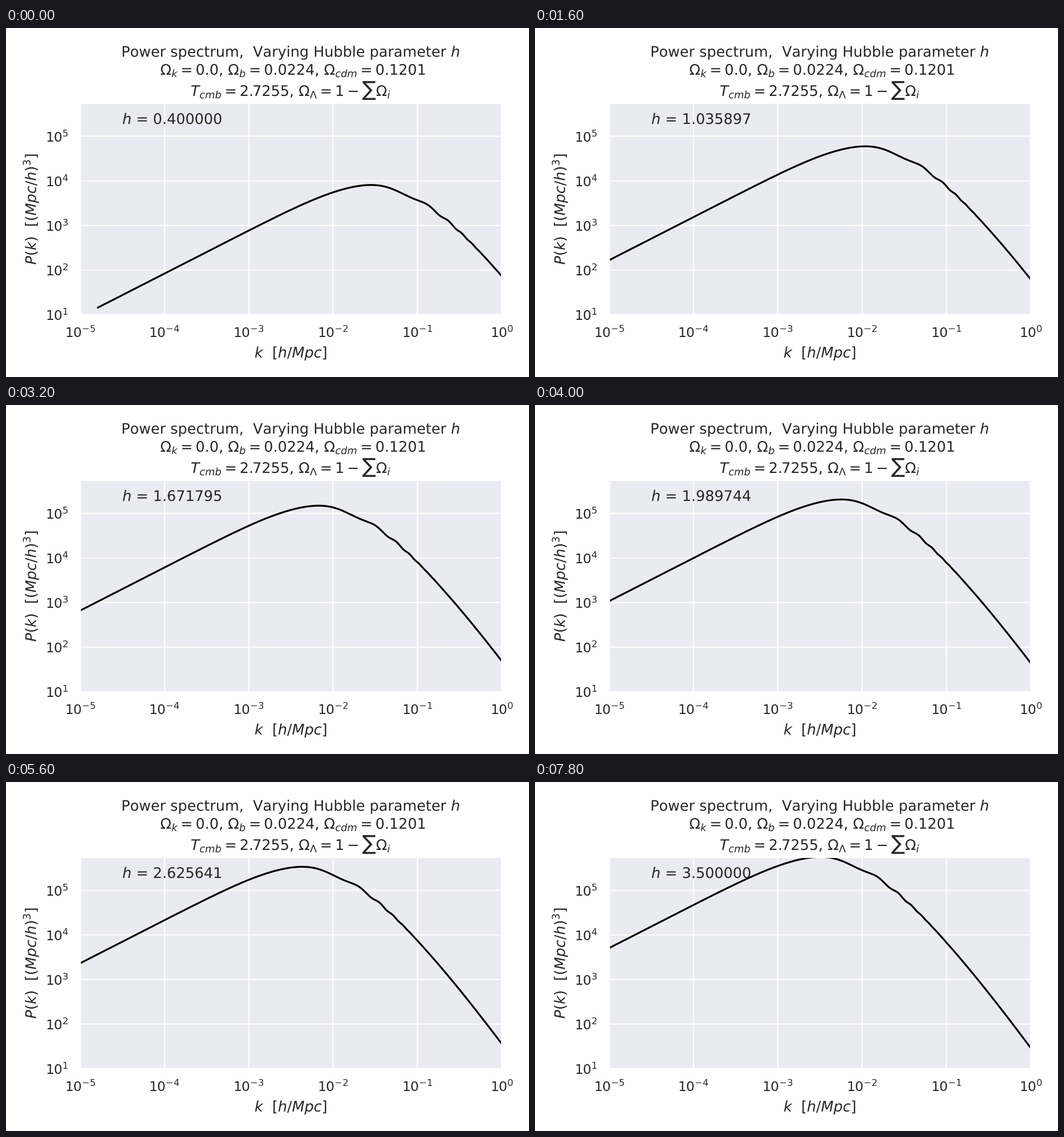
Animation of 917 by 611 pixels, one loop 8000 ms. Source, as a matplotlib script:

```python
import numpy as np
import matplotlib.pyplot as plt
from matplotlib.animation import FuncAnimation
from matplotlib.patheffects import Normal

W, H, DPI = 917, 611, 128
S = W / 6 / DPI                      # type and line scale of a 6 inch wide figure
FRAMES, INTERVAL = 40, 200
HUBBLE = np.linspace(0.4, 3.5, FRAMES)

# Physical densities and primordial spectrum
WB, WC, WR = 0.0224, 0.1201, 4.18e-5
WM = WB + WC
T_CMB = 2.7255
A_S, N_S, K_PIVOT = 2.135e-9, 0.966, 0.05
HUBBLE_DIST = 2997.92                # c / (100 km/s/Mpc)
MID = (np.arange(4000) + 0.5) / 4000


def transfer(k):
    """Eisenstein & Hu (1998) matter transfer function, k in 1/Mpc."""
    fb, fc = WB / WM, WC / WM
    th2 = (T_CMB / 2.7) ** 2
    z_eq = 2.5e4 * WM / th2 ** 2
    k_eq = 0.0746 * WM / th2
    b1 = 0.313 * WM ** -0.419 * (1 + 0.607 * WM ** 0.674)
    b2 = 0.238 * WM ** 0.223
    z_d = 1291 * WM ** 0.251 / (1 + 0.659 * WM ** 0.828) * (1 + b1 * WB ** b2)
    r_d, r_eq = (31.5 * WB / th2 ** 2 * 1000 / z for z in (z_d, z_eq))
    s = 2 / (3 * k_eq) * np.sqrt(6 / r_eq) * np.log(
        (np.sqrt(1 + r_d) + np.sqrt(r_d + r_eq)) / (1 + np.sqrt(r_eq)))
    k_silk = 1.6 * WB ** 0.52 * WM ** 0.73 * (1 + (10.4 * WM) ** -0.95)

    a1 = (46.9 * WM) ** 0.670 * (1 + (32.1 * WM) ** -0.532)
    a2 = (12.0 * WM) ** 0.424 * (1 + (45.0 * WM) ** -0.582)
    alpha_c = a1 ** -fb * a2 ** -(fb ** 3)
    c1 = 0.944 / (1 + (458 * WM) ** -0.708)
    c2 = (0.395 * WM) ** -0.0266
    beta_c = 1 / (1 + c1 * (fc ** c2 - 1))

    y = (1 + z_eq) / (1 + z_d)
    root = np.sqrt(1 + y)
    g = y * (-6 * root + (2 + 3 * y) * np.log((root + 1) / (root - 1)))
    alpha_b = 2.07 * k_eq * s * (1 + r_d) ** -0.75 * g
    beta_b = 0.5 + fb + (3 - 2 * fb) * np.sqrt((17.2 * WM) ** 2 + 1)
    beta_node = 8.41 * WM ** 0.435

    q = k / (13.41 * k_eq)
    ks = k * s

    def t0(alpha, beta):
        log = np.log(np.e + 1.8 * beta * q)
        c = 14.2 / alpha + 386 / (1 + 69.9 * q ** 1.08)
        return log / (log + c * q ** 2)

    f = 1 / (1 + (ks / 5.4) ** 4)
    t_c = f * t0(1, beta_c) + (1 - f) * t0(alpha_c, beta_c)
    ks_node = ks / (1 + (beta_node / ks) ** 3) ** (1 / 3)
    t_b = (t0(1, 1) / (1 + (ks / 5.2) ** 2)
           + alpha_b / (1 + (beta_b / ks) ** 3) * np.exp(-(k / k_silk) ** 1.4))
    return fb * t_b * np.sinc(ks_node / np.pi) + fc * t_c


def growth(h):
    """Linear growth factor today for flat matter plus Lambda."""
    om = WM / h ** 2
    return 2.5 * om * np.mean((om / MID + (1 - om) * MID ** 2) ** -1.5)


def conformal_age(h):
    a = MID ** 2
    rate = np.sqrt(WM * a + WR + (h ** 2 - WM) * a ** 4)
    return HUBBLE_DIST * np.mean(2 * MID / rate)


def spectrum(h):
    """k in h/Mpc and P(k) in (Mpc/h)^3, from the largest computed scale."""
    k = np.geomspace(0.1 / conformal_age(h), 2 * h, 700)
    amp = 8 * np.pi ** 2 / 25 * A_S * HUBBLE_DIST ** 4 / WM ** 2
    p = amp * growth(h) ** 2 * k * (k / K_PIVOT) ** (N_S - 1) * transfer(k) ** 2
    return k / h, p * h ** 3


INK = "0.15"
plt.rcParams.update({
    "font.family": "DejaVu Sans", "font.size": 12 * S,
    "mathtext.fontset": "dejavusans",
    "text.color": INK, "axes.labelcolor": INK,
})
OUTLINE = dict(fontsize=12 * S, path_effects=[Normal()])   # text at subpixel positions

fig = plt.figure(figsize=(W / DPI, H / DPI), dpi=DPI, facecolor="white")
left, right, top, bottom = 130.1, 869.2, 131.7, 502.0
ax = fig.add_axes([left / W, 1 - bottom / H, (right - left) / W, (bottom - top) / H],
                  facecolor="#EAEAF2")
ax.set(xscale="log", yscale="log", xlim=(1e-5, 1), ylim=(10, 5.5e5))
ax.minorticks_off()
ax.set_axisbelow(True)
ax.grid(True, color="white", lw=S, snap=False)
ax.tick_params(length=0, pad=9.5 * S, labelsize=11 * S, labelcolor=INK)
for spine in ax.spines.values():
    spine.set(color="white", linewidth=1.25 * S, snap=False)

title = [
    (50.3, "Power spectrum,  Varying Hubble parameter $h$"),
    (82.0, r" $\Omega_k = 0.0$, $\Omega_b = 0.0224$, $\Omega_{cdm} = 0.1201$"),
    (119.0, r"$T_{cmb} = 2.7255$, $\Omega_\Lambda = 1 - \sum \Omega_i$"),
]
for y, line in title:
    fig.text((left + right) / 2 / W, 1 - y / H, line, ha="center", va="baseline", **OUTLINE)
ax.set_xlabel("$k$  $[h/Mpc]$", labelpad=4 * S, **OUTLINE)
ax.set_ylabel("$P(k)$  $[(Mpc/h)^3]$", labelpad=4 * S, **OUTLINE)

curve, = ax.plot([], [], color="black", lw=1.5 * S, solid_capstyle="round")
label = ax.text(0.1, 0.902, "", transform=ax.transAxes, **OUTLINE)


def update(i):
    h = HUBBLE[i]
    curve.set_data(*spectrum(h))
    label.set_text(f"$h$ = {h:.6f}")
    return curve, label


anim = FuncAnimation(fig, update, frames=FRAMES, interval=INTERVAL,
                     repeat=True, repeat_delay=0)
plt.show()
```
